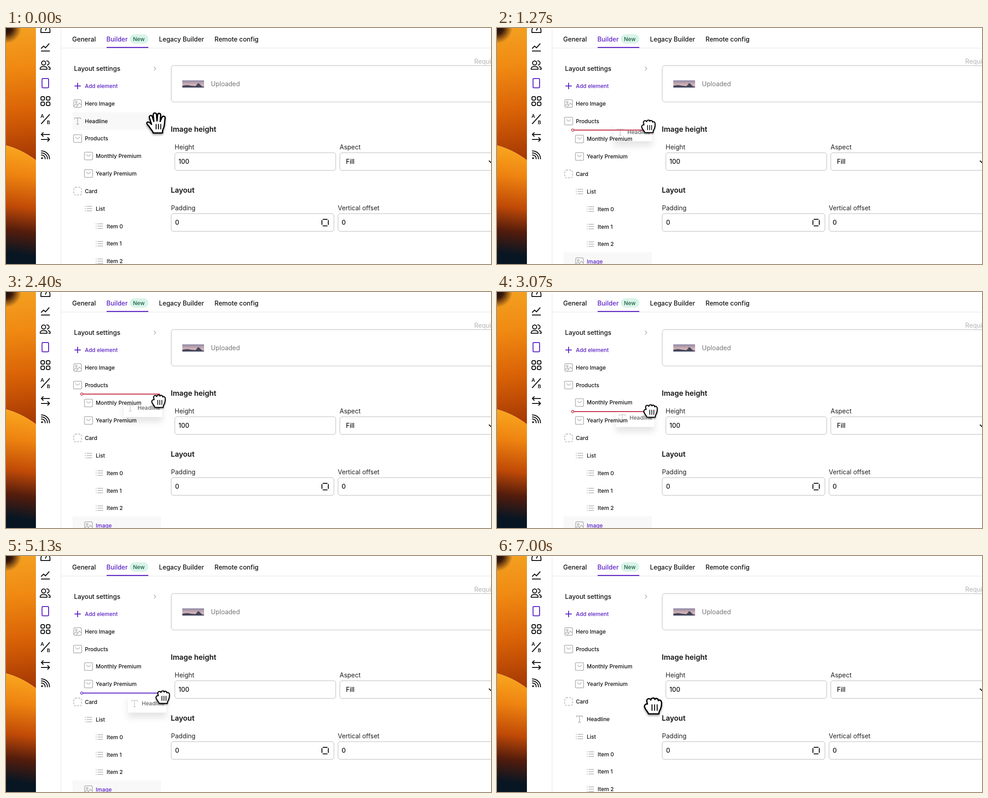
Write an HTML page that moves like this. It is 1070 px wide and 523 px high and loops after 7.07 s.

```html
<!DOCTYPE html>
<html lang="en">
<head>
<meta charset="utf-8">
<title>Drag to reorder</title>
<style>
  html, body { margin: 0; height: 100%; overflow: hidden; background: #fff; }
  svg { display: block; width: 100vw; height: 100vh; }
  text { font: 500 14px Inter, sans-serif; fill: #111; }
  .h { font-size: 16px; font-weight: 600; }
  .label { font-weight: 400; fill: #222; }
  .row { font-size: 12px; }
  .purple { fill: #5b21c4; }
  .icon { fill: none; stroke: #b0b0b0; stroke-width: 1.5; stroke-linejoin: round; }
  .nav { fill: none; stroke: #111; stroke-width: 2; stroke-linecap: round; stroke-linejoin: round; }
  .field { fill: #fff; stroke: #b8b8b8; }
  .ghost { filter: drop-shadow(0 11px 7px rgba(0, 0, 0, .1)); }
  #hand { fill: #fff; stroke: #000; stroke-width: 2.2; stroke-linejoin: round; stroke-linecap: round;
    filter: drop-shadow(0 2px 1.5px rgba(0, 0, 0, .45)); }
</style>
</head>
<body>
<svg viewBox="0 0 1070 523" preserveAspectRatio="none">
  <defs>
    <linearGradient id="petal" gradientUnits="userSpaceOnUse" x1="8" y1="0" x2="40" y2="285">
      <stop offset="0" stop-color="#f3a021"/><stop offset=".3" stop-color="#f08a12"/>
      <stop offset=".65" stop-color="#d96206"/><stop offset="1" stop-color="#a83a04"/>
    </linearGradient>
    <linearGradient id="lower" gradientUnits="userSpaceOnUse" x1="48" y1="270" x2="18" y2="500">
      <stop offset="0" stop-color="#f9a41f"/><stop offset=".25" stop-color="#ee8410"/>
      <stop offset=".55" stop-color="#c04a07"/><stop offset=".78" stop-color="#541c0c"/>
      <stop offset="1" stop-color="#081623"/>
    </linearGradient>
    <radialGradient id="corner" gradientUnits="userSpaceOnUse" cx="0" cy="0" r="34">
      <stop offset="0" stop-color="#170d10"/><stop offset=".4" stop-color="#3a1a0c"/>
      <stop offset="1" stop-color="#3a1a0c" stop-opacity="0"/>
    </radialGradient>
    <linearGradient id="sky" x1="0" y1="0" x2="0" y2="1">
      <stop offset="0" stop-color="#8f8ba6"/><stop offset=".65" stop-color="#d9b5b4"/><stop offset="1" stop-color="#8c8296"/>
    </linearGradient>
    <g id="image"><rect x="-8.5" y="-8.5" width="17" height="17" rx="3"/><circle cx="-3" cy="-3" r="1.8"/><path d="M-8 5l5-4 3 3 4-5 4 4M-3 8l3-4"/></g>
    <path id="type" d="M-6.5-4v-3h13v3M0-7V7M-3 7h6"/>
    <g id="bag"><rect x="-9" y="-8.5" width="18" height="17" rx="2"/><path d="M-4-4a4 4 0 0 0 8 0"/></g>
    <rect id="card" x="-8.5" y="-8.5" width="17" height="17" rx="3.5" stroke-dasharray="4 2.6"/>
    <path id="list" d="M-8-5h2M-8 0h2M-8 5h2M-4-5H8M-4 0H8M-4 5H8"/>
  </defs>

  <rect width="1070" height="523" fill="#fff"/>
  <path d="M0 0H66V293Q36 270 0 260z" fill="url(#petal)"/>
  <path d="M0 260Q36 270 66 293V523H0z" fill="url(#lower)"/>
  <rect width="66" height="60" fill="url(#corner)"/>

  <path d="M121.5 0V523M122 44.5H1070" stroke="#e6e6e6"/>
  <g class="nav">
    <path d="M77 10h20V5a10 10 0 0 0-20 0zM87 5l2-4"/>
    <path d="M78 51h18M78 45l5-5 4 4 8-9"/>
    <circle cx="83" cy="77.500" r="4.500"/>
    <path d="M75.500 91.500v-2a6 5 0 0 1 6-4h3a6 5 0 0 1 6 4v2zM90 73a4.500 4.500 0 0 1 1 9M93 85.500a6 5 0 0 1 4.500 4v2h-3"/>
    <rect x="79.500" y="112" width="14.500" height="20.500" rx="2" stroke="#5b21c4"/>
    <rect x="77" y="152" width="8" height="8" rx="3"/><rect x="89" y="152" width="8" height="8" rx="3"/>
    <rect x="77" y="164" width="8" height="8" rx="3"/><rect x="89" y="164" width="8" height="8" rx="3"/>
    <path d="M78 212L96 192"/>
    <path d="M96 236H78l4-4M78 236l4 4M78 247H96l-4-4M96 247l-4 4"/>
    <path d="M78 281.500a8 8 0 0 1 8.500 8.500M78 277a13 13 0 0 1 13.500 13M78 272.500a17.500 17.500 0 0 1 18 17.500"/>
    <circle cx="79.500" cy="288.500" r="1"/>
    <path d="M1018 114v15h15M1013 119h15v15" stroke-linecap="butt"/>
    <path d="M1056 118h16M1060 118v-3h8v3M1058 118v12q0 2 2 2h8q2 0 2-2v-12"/>
  </g>
  <text x="76" y="199" style="font-size:11px;font-weight:600">A</text>
  <text x="90" y="213" style="font-size:11px;font-weight:600">B</text>

  <text x="146" y="29.500">General</text>
  <text x="221.500" y="29.500" class="purple">Builder</text>
  <rect x="273" y="14" width="41" height="20.500" rx="10" fill="#d8f4e8"/>
  <text x="280" y="28.500" class="row" style="fill:#1d5b49">New</text>
  <rect x="222" y="42" width="92" height="2.200" fill="#5b21c4"/>
  <text x="337.500" y="29.500">Legacy Builder</text>
  <text x="460" y="29.500">Remote config</text>

  <text x="150" y="95">Layout settings</text>
  <path d="M326.500 86l4 4-4 4" class="icon" stroke="#888"/>
  <path d="M151 128.500h14M158 121.500v14" stroke="#5b21c4" stroke-width="2"/>
  <text x="174" y="133" class="row purple">Add element</text>

  <text x="1033" y="79" class="label" style="fill:#b3b3b3">Required</text>
  <rect x="364.500" y="83.500" width="720" height="80.500" rx="5" class="field"/>
  <rect x="389" y="116" width="48" height="16" fill="url(#sky)"/>
  <path d="M389 128q10-3 20 0l9 1 6-7 4 3 5 5 4 1v1h-48z" fill="#464760"/>
  <text x="452" y="129" class="label" style="fill:#747474">Uploaded</text>

  <text x="363.500" y="230" class="h">Image height</text>
  <text x="372" y="269" class="label">Height</text>
  <rect x="372.500" y="276.500" width="355" height="39" rx="4.500" class="field"/>
  <text x="380.500" y="301">100</text>
  <text x="736" y="269" class="label">Aspect</text>
  <rect x="736.500" y="276.500" width="355" height="39" rx="4.500" class="field"/>
  <text x="750" y="301">Fill</text>
  <path d="M1066 294.500l4 4 4-4" class="nav"/>

  <text x="363.500" y="365" class="h">Layout</text>
  <text x="364" y="404" class="label">Padding</text>
  <rect x="364.500" y="411.500" width="359" height="39" rx="4.500" class="field"/>
  <text x="373" y="436">0</text>
  <path d="M699.500 424h9M699.500 438.500h9M697 426.500v9M711 426.500v9" class="nav"/>
  <text x="732" y="404" class="label">Vertical offset</text>
  <rect x="732.500" y="411.500" width="359" height="39" rx="4.500" class="field"/>
  <text x="740.500" y="436">0</text>

  <g id="tree"></g>
  <g id="hand"><path id="shape"/><path id="creases" stroke-width="1.600"/></g>
</svg>
<script>
const LOOP = 7070, GRAB = 480, DROP = 6270, PURPLE = '#5b21c4', RED = '#c2283f';
const $ = id => document.getElementById(id);

const headline = depth => ['type', 'Headline', depth];
const hero = ['image', 'Hero Image', 0];
const products = [['bag', 'Products', 0], ['bag', 'Monthly Premium', 1], ['bag', 'Yearly Premium', 1]];
const card = ['card', 'Card', 0];
const list = [['list', 'List', 1], ...[0, 1, 2].map(i => ['list', 'Item ' + i, 2]), ['image', 'Image', 1]];
const before = [hero, headline(0), ...products, card, ...list];
const during = [hero, ...products, card, ...list];
const after = [hero, ...products, card, headline(1), ...list];

// time, hand x, hand y, dragged label y
const path = [
  [0, 332.5, 211, 206], [GRAB, 333, 210.5, 216], [670, 333.5, 211, 222], [1870, 335, 224.5, 239.5],
  [3070, 339, 263.5, 279], [3930, 341, 282.5, 295], [5130, 346, 312.5, 327],
  [5700, 346, 331, 346], [7000, 344.5, 332, 347]
];
// start time, rows above the line, left end, colour
const drops = [
  [GRAB, 2, 167, RED], [2500, 3, 167, RED], [3600, 4, 146, PURPLE], [4400, 4, 167, PURPLE], [5450, 5, 167, PURPLE]
];

const OPEN = 'M-6 17C-7 13-11 10-13 6C-15 3-18 2-17-1C-16-3-12-2-9 2L-12.500-9C-14-14-9-15-7.500-11' +
  'L-5-3L-6-14C-6-19-.5-19-.3-14L.5-4L1.500-14C2-18.500 7-18 6.800-13.500L6-3L9-10' +
  'C11-14 15.500-12 14.500-8C13-2 14.500 5 11 10C10 13 10 15 10 17Z';
const CLOSED = 'M-8 14C-9 11-13 7-14 4C-16 1-15-2-12-3L-10-3C-11-8-12-11-9-12C-7-13-5-12-4-10' +
  'C-4-14 2-15 3-11C4-14 9-13 9-9C11-11 14-10 14.500-6C15 0 14 4 11 9C10 11 10 12 10 14Z';

const ramp = (t, a, b) => {
  const k = Math.min(1, Math.max(0, (t - a) / (b - a)));
  return k * k * (3 - 2 * k);
};

function follow(t) {
  const i = path.findIndex(p => p[0] > t);
  if (i < 0) return path[path.length - 1];
  const a = path[i - 1], b = path[i], k = (t - a[0]) / (b[0] - a[0]);
  return a.map((v, j) => v + (b[j] - v) * k);
}

const rowY = i => 167.3 + 38.83 * i;
const item = (icon, label, x, y, cls = '') =>
  `<use href="#${icon}" class="icon" x="${x}" y="${y}"/><text class="row ${cls}" x="${x + 16}" y="${y + 4.4}">${label}</text>`;
const highlight = i => `<rect x="147" y="${rowY(i) - 19.4}" width="195" height="38.800" fill="#f8f8f8"/>`;

function treeMarkup(t, x, y) {
  if (t < GRAB || t >= DROP) {
    const rows = t < GRAB ? before : after;
    return (t < GRAB ? highlight(1) : '') +
      rows.map(([icon, label, depth], i) => item(icon, label, 158 + 24 * depth, rowY(i))).join('');
  }
  const [, above, left, color] = drops.filter(d => d[0] <= t).pop();
  const lineY = rowY(above) - 18.8;
  const ghost = `<rect class="ghost" x="${x - 77}" y="${y - 20}" width="85" height="40" fill="#fff"/>` +
    `<g opacity=".65">${item('type', 'Headline', x - 62.5, y)}</g>`;
  const rows = during.map(([icon, label, depth], i) =>
    item(icon, label, 158 + 24 * depth, rowY(i) + (i >= above ? 1 : 0), label === 'Image' ? 'purple' : '')).join('');
  const knob = left > 146 ? `<circle cx="${left}" cy="${lineY}" r="2.500" fill="#fff" stroke="${color}" stroke-width="1.300"/>` : '';
  return highlight(9) + ghost + rows +
    `<path d="M${left} ${lineY}H340" stroke="${color}" stroke-width="2"/>` + knob;
}

function draw(now) {
  const t = now % LOOP, [, x, y, ghostY] = follow(t);
  const open = t < 740;
  const scale = 1.27 - 0.27 * (ramp(t, 130, 450) - ramp(t, DROP, DROP + 380));
  $('tree').innerHTML = treeMarkup(t, x, ghostY);
  $('hand').setAttribute('transform', `translate(${x} ${y}) scale(${scale})`);
  $('shape').setAttribute('d', open ? OPEN : CLOSED);
  $('creases').setAttribute('d', open ? 'M-1 2v8M3 2v8M7 2v8' : 'M-2-2V8M2.500-2V8M7-2V8');
  requestAnimationFrame(draw);
}
draw(performance.now());
</script>
</body>
</html>
```
